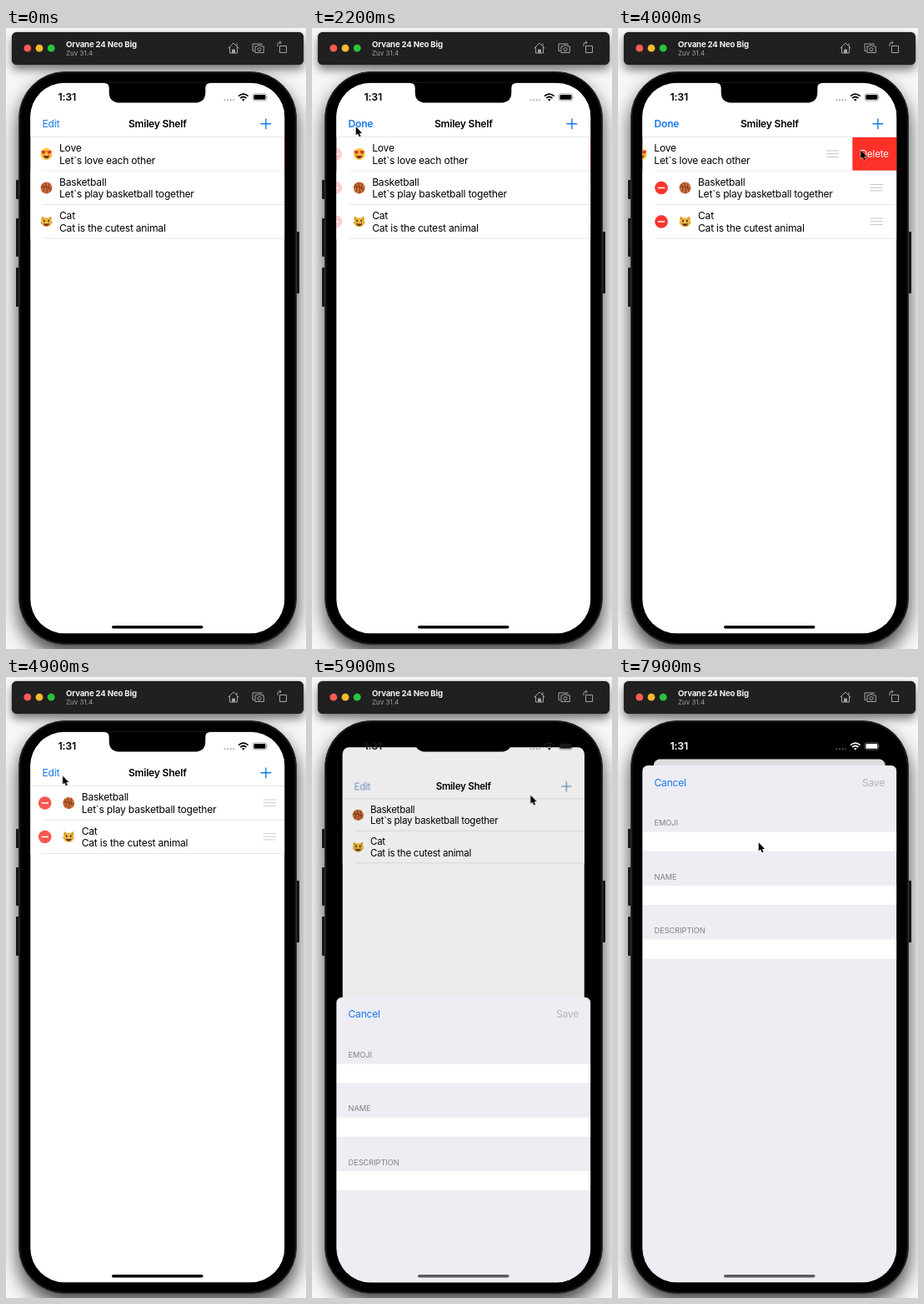
Recreate the animation shown at these times as an HTML page. Size 360 by 744 pixels, loop 8 s.

```html
<!DOCTYPE html>
<html lang="en">
<head>
<meta charset="utf-8">
<title>List editor demo</title>
<style>
@property --edit { syntax: "<number>"; inherits: true; initial-value: 0; }
@property --swipe { syntax: "<number>"; inherits: true; initial-value: 0; }
@property --gone { syntax: "<number>"; inherits: true; initial-value: 0; }
@property --sheet { syntax: "<number>"; inherits: true; initial-value: 0; }

html, body { margin: 0; width: 100%; height: 100%; overflow: hidden; background: #fff; }
#stage {
  position: relative; width: 360px; height: 744px; overflow: hidden; background: #f7f7f7;
  animation: edit 8s linear infinite, swipe 8s linear infinite,
             gone 8s linear infinite, sheet 8s linear infinite;
}
#stage > * { position: absolute; }
.phone {
  left: 15px; top: 52px; width: 334px; height: 687px; border-radius: 56px;
  box-sizing: border-box; background: #000; border: 1.5px solid #303030;
  box-shadow: inset 0 0 0 1.5px #151515, 0 12px 22px rgba(0, 0, 0, .72);
}
.bar {
  left: 6.5px; top: 5px; width: 350px; height: 38.5px; border-radius: 6px;
  background: #202020; box-shadow: 0 6px 11px rgba(0, 0, 0, .5), 0 0 1px #000;
}
.key { width: 4px; background: #202020; border-radius: 1px; }
svg { left: 0; top: 0; }
text { font: 12.1px Inter, Roboto, sans-serif; letter-spacing: -.23px; white-space: pre; }
.bold { font-weight: 600; }
.blue { fill: #1479e8; }
.label { font-size: 9.25px; letter-spacing: -.05px; fill: #808086; }
.sep { stroke: #e1e1e3; stroke-width: .8; }

.slide { transform: translateX(calc(var(--edit) * 32px)); }
.minus { opacity: var(--edit); }
.grip { transform: translateX(calc((1 - var(--edit)) * 37px)); opacity: var(--edit); }
.first { transform: translateX(calc(var(--swipe) * -52.7px)); opacity: calc(1 - var(--gone)); }
.up { transform: translateY(calc(var(--gone) * -40.5px)); }
.card {
  transform-origin: 181.75px 66px;
  transform: translateY(calc(var(--sheet) * 33px)) scale(calc(1 - var(--sheet) * .09));
}
.tint { filter: saturate(calc(1 - var(--sheet) * .8)) opacity(calc(1 - var(--sheet) * .5)); }
.dim { opacity: calc(var(--sheet) * .135); }
.sheet { transform: translateY(calc((1 - var(--sheet)) * 638px)); }
.edit { animation: editLabel 8s step-end infinite; }
.done { animation: doneLabel 8s step-end infinite; }
.status { animation: status 8s linear infinite; }
.home { animation: home 8s linear infinite; }
.cursor { animation: cursor 8s linear infinite; }

/* Sampled critically damped springs */
@keyframes edit {
  0%, 26.83% { --edit: 0; }
  27.5% { --edit: .25; }
  28.75% { --edit: .757; }
  30% { --edit: .939; }
  31.25% { --edit: .986; }
  33.75%, 60.7% { --edit: 1; }
  61.25% { --edit: .84; }
  62.5% { --edit: .28; }
  63.75% { --edit: .072; }
  65% { --edit: .016; }
  67.5%, 100% { --edit: 0; }
}
@keyframes swipe {
  0%, 40.6% { --swipe: 0; }
  41.25% { --swipe: .25; }
  42.5% { --swipe: .757; }
  43.75% { --swipe: .939; }
  45% { --swipe: .986; }
  47%, 100% { --swipe: 1; }
}
@keyframes gone {
  0%, 50.7% { --gone: 0; }
  51.25% { --gone: .22; }
  52.5% { --gone: .74; }
  53.75% { --gone: .935; }
  55% { --gone: .985; }
  57%, 100% { --gone: 1; }
}
@keyframes sheet {
  0%, 72.41% { --sheet: 0; }
  72.77% { --sheet: .09; }
  73.12% { --sheet: .264; }
  73.75% { --sheet: .561; }
  74.53% { --sheet: .801; }
  75.24% { --sheet: .908; }
  75.94% { --sheet: .96; }
  77.5% { --sheet: .994; }
  80%, 100% { --sheet: 1; }
}
@keyframes editLabel { 0% { opacity: 1; } 27% { opacity: 0; } 60.8%, 100% { opacity: 1; } }
@keyframes doneLabel { 0% { opacity: 0; } 27% { opacity: 1; } 60.8%, 100% { opacity: 0; } }
@keyframes status { 0%, 73% { color: #000; } 73.75% { color: #181818; } 76%, 100% { color: #fff; } }
@keyframes home { 0%, 72.5% { color: #000; } 73.75%, 100% { color: #5c5c5f; } }
@keyframes cursor {
  0%, 9% { transform: translate(372px, 230px); }
  10% { transform: translate(349px, 226px); }
  13% { transform: translate(232px, 200px); }
  16.25% { transform: translate(118px, 163px); }
  20% { transform: translate(50px, 132px); }
  22.5% { transform: translate(56px, 122px); }
  25%, 31.25% { transform: translate(52px, 117px); }
  37.5%, 42.5% { transform: translate(51px, 148px); }
  45% { transform: translate(152px, 149px); }
  47.5% { transform: translate(264px, 146px); }
  48.75%, 53% { transform: translate(290.5px, 145px); }
  56.25% { transform: translate(185px, 131px); }
  60%, 60.5% { transform: translate(62px, 115px); }
  61.25% { transform: translate(67px, 117px); }
  63% { transform: translate(105px, 126px); }
  67% { transform: translate(258px, 124px); }
  70%, 72.5% { transform: translate(312px, 115px); }
  73.75% { transform: translate(262px, 140px); }
  75.5% { transform: translate(196px, 177px); }
  77.5% { transform: translate(150px, 200px); }
  82.5%, 86.5% { transform: translate(125px, 198px); }
  88.75% { transform: translate(220px, 172px); }
  91.25%, 92.5% { transform: translate(325px, 135px); }
  95% { transform: translate(236px, 168px); }
  97.5% { transform: translate(177px, 191px); }
  98.75%, 100% { transform: translate(168px, 197px); }
}
</style>
</head>
<body>
<div id="stage">
  <div class="key" style="left:11.5px;top:182px;height:23px"></div>
  <div class="key" style="left:11.5px;top:228px;height:46px"></div>
  <div class="key" style="left:11.5px;top:287px;height:47px"></div>
  <div class="key" style="left:348px;top:244px;height:74px"></div>
  <div class="phone"></div>
  <div class="bar"></div>

  <svg width="360" height="744" viewBox="0 0 360 744">
    <defs>
      <clipPath id="screen"><rect x="29.3" y="65.7" width="305" height="659.6" rx="41"/></clipPath>
      <g id="minus">
        <circle r="7.8" fill="#f8372e"/>
        <path d="M-4.2 0H4.2" stroke="#fff" stroke-width="1.5"/>
      </g>
      <path id="grip" d="M302.5 147H317.7M302.5 150.7H317.7M302.5 154.4H317.7" stroke="#c3c3c6" stroke-width="1"/>
      <g id="love">
        <circle r="6.9" fill="#f9c03a"/>
        <path d="M-3.8 1.6Q0 2.6 3.8 1.6Q3 5.4 0 5.4T-3.8 1.6Z" fill="#76341c"/>
        <path id="heart" d="M-3.4 .5L-5.9 -2Q-6.6 -4.2 -4.7 -4.3Q-3.8 -4.1 -3.4 -3.3Q-2.4 -4.6 -1.2 -3.8Q-.4 -2.6 -1.4 -1.4Z" fill="#e0352c"/>
        <use href="#heart" transform="scale(-1 1)"/>
      </g>
      <g id="ball">
        <circle r="6.9" fill="#cf6a35"/>
        <path d="M-6.7 -1.5Q0 -2.4 6.7 1.5M-1.6 -6.7Q2 0 .6 6.8M-5 -4.6Q-1 .5 -4.4 5.2M3.6 -5.7Q1.6 .5 5 4.6" fill="none" stroke="#5a2b1a" stroke-width=".7"/>
      </g>
      <g id="cat">
        <path d="M-5.6 -6.8L-2.2 -4.4Q0 -4.9 2.2 -4.4L5.6 -6.8Q6.6 -3.4 6.4 .4Q6 6.2 0 6.2T-6.4 .4Q-6.6 -3.4 -5.6 -6.8Z" fill="#eeb942"/>
        <path d="M-5.1 -5.2L-3.4 -3.8L-5.2 -2.4ZM5.1 -5.2L3.4 -3.8L5.2 -2.4Z" fill="#b5722a"/>
        <ellipse cx="-2.6" cy="-.9" rx=".9" ry="1.5" fill="#453415"/>
        <ellipse cx="2.6" cy="-.9" rx=".9" ry="1.5" fill="#453415"/>
        <path d="M-3.8 2Q0 3 3.8 2Q2.8 5.2 0 5.2T-3.8 2Z" fill="#6f3520"/>
        <path d="M-7.4 1.2L-4.8 1.6M7.4 1.2L4.8 1.6" stroke="#8a6a2a" stroke-width=".5"/>
      </g>
    </defs>

    <!-- Window bar -->
    <circle cx="25.8" cy="24.2" r="4.4" fill="#ff5b54"/>
    <circle cx="40" cy="24.2" r="4.4" fill="#fdb92c"/>
    <circle cx="54.2" cy="24.2" r="4.4" fill="#28c440"/>
    <text x="72" y="23" fill="#f4f4f4" style="font-size:9.6px;font-weight:700;letter-spacing:-.15px">Orvane 24 Neo Big</text>
    <text x="72" y="33" fill="#a2a2a2" style="font-size:8px;letter-spacing:0">Zuv 31.4</text>
    <g fill="none" stroke="#a4a4a4" stroke-width="1">
      <path d="M266.5 24.5L273 18L279.5 24.5M268.5 23V30H277.5V23M277 21.5V18.5"/>
      <path d="M271.5 30V26H274.5V30" fill="#a4a4a4"/>
      <path d="M298 27.5H296V19H307V20.5M299 22H301.3L302.3 20.8H305.3L306.3 22H309.3V29.5H299Z"/>
      <circle cx="304" cy="25.6" r="2"/>
      <path d="M328.5 21.5H336.5V29.5H328.5ZM326 22V19.5Q326 17.5 328 17.5H330M328.3 15.7L330.2 17.5L328.3 19.3"/>
    </g>

    <g clip-path="url(#screen)">
      <g class="card">
        <rect x="29" y="65.5" width="305.5" height="680" rx="8" fill="#fff"/>
        <g class="first">
          <g class="slide">
            <use href="#minus" class="minus" x="20" y="151"/>
            <use href="#love" x="48.5" y="151"/>
            <text x="64" y="148.3">Love</text>
            <text x="64" y="162.7">Let`s love each other</text>
          </g>
          <use href="#grip" class="grip"/>
          <rect x="334" y="130.5" width="60" height="40.5" fill="#fe3129"/>
          <text x="360.6" y="154.7" fill="#fff" text-anchor="middle" style="font-size:11.3px;letter-spacing:-.1px">Delete</text>
        </g>
        <path class="sep" d="M44 171H334"/>
        <g class="up">
          <rect x="29" y="171.5" width="305.5" height="40" fill="#fff"/>
          <g class="slide">
            <use href="#minus" class="minus" x="20" y="191.5"/>
            <use href="#ball" x="48.5" y="191.5"/>
            <text x="64" y="188.8">Basketball</text>
            <text x="64" y="203.2">Let`s play basketball together</text>
          </g>
          <use href="#grip" class="grip" y="40.5"/>
          <path class="sep" d="M44 211.5H334"/>
          <rect x="29" y="212" width="305.5" height="41" fill="#fff"/>
          <g class="slide">
            <use href="#minus" class="minus" x="20" y="232"/>
            <use href="#cat" x="48.5" y="232"/>
            <text x="64" y="229.3">Cat</text>
            <text x="64" y="243.7">Cat is the cutest animal</text>
          </g>
          <use href="#grip" class="grip" y="81"/>
          <path class="sep" d="M44 252H334"/>
        </g>
        <rect x="29" y="74" width="305.5" height="56.5" fill="#fff"/>
        <path class="sep" d="M29 130.5H334.5"/>
        <g class="tint">
          <text class="blue edit" x="43.5" y="119.2">Edit</text>
          <text class="blue bold done" x="43.5" y="119.2">Done</text>
          <path d="M305.5 114.8H318.3M311.9 108.4V121.2" stroke="#1479e8" stroke-width="1.4"/>
        </g>
        <text class="bold" x="181.8" y="119.2" text-anchor="middle">Smiley Shelf</text>
        <rect class="dim" x="29" y="65.5" width="305.5" height="680" rx="8"/>
      </g>

      <g class="sheet">
        <rect x="29" y="106" width="305.5" height="660" rx="7" fill="#eeedf4"/>
        <text class="blue" x="43.5" y="130.5">Cancel</text>
        <text x="320" y="130.5" text-anchor="end" fill="#b3b2b8">Save</text>
        <text class="label" x="43.5" y="178.3">EMOJI</text>
        <text class="label" x="43.5" y="242.6">NAME</text>
        <text class="label" x="43.5" y="306.9">DESCRIPTION</text>
        <path d="M29 185.8h305.5v23h-305.5zM29 250.1h305.5v23h-305.5zM29 314.4h305.5v23h-305.5z" fill="#fff"/>
      </g>

      <g class="status" fill="currentColor">
        <text class="bold" x="62.5" y="87.4" style="font-size:12.4px;letter-spacing:-.2px">1:31</text>
        <path d="M261.5 86.2H274" stroke="currentColor" stroke-width="2" stroke-dasharray="2 1.6" opacity=".3"/>
        <g fill="none" stroke="currentColor" stroke-width="1.7">
          <path d="M279 81.6Q284.8 76.6 290.6 81.6M281.2 84Q284.8 81 288.4 84"/>
        </g>
        <path d="M282.9 85.6Q284.8 84.2 286.7 85.6L284.8 87.7Z"/>
        <rect x="296.2" y="78.8" width="16.4" height="8.2" rx="2.4" fill="none" stroke="currentColor" stroke-width=".7" opacity=".5"/>
        <rect x="297.4" y="80" width="14" height="5.8" rx="1.4"/>
        <path d="M313.6 81.5Q315 82.9 313.6 84.3Z" opacity=".5"/>
      </g>
      <path d="M118 66Q123.7 66 123.7 72V77Q123.7 89.6 137 89.6H226Q239.3 89.6 239.3 77V72Q239.3 66 245 66V60H118Z"/>
      <rect class="home" x="127" y="716" width="109.5" height="3.6" rx="1.8" fill="currentColor"/>
    </g>

    <g class="cursor">
      <path d="M.7 1.2V11.6L3 9.6L4.7 13.2L6.5 12.4L4.9 8.9H8.1Z" stroke="#fff" stroke-width=".8" paint-order="stroke"/>
    </g>
  </svg>
</div>
</body>
</html>
```
